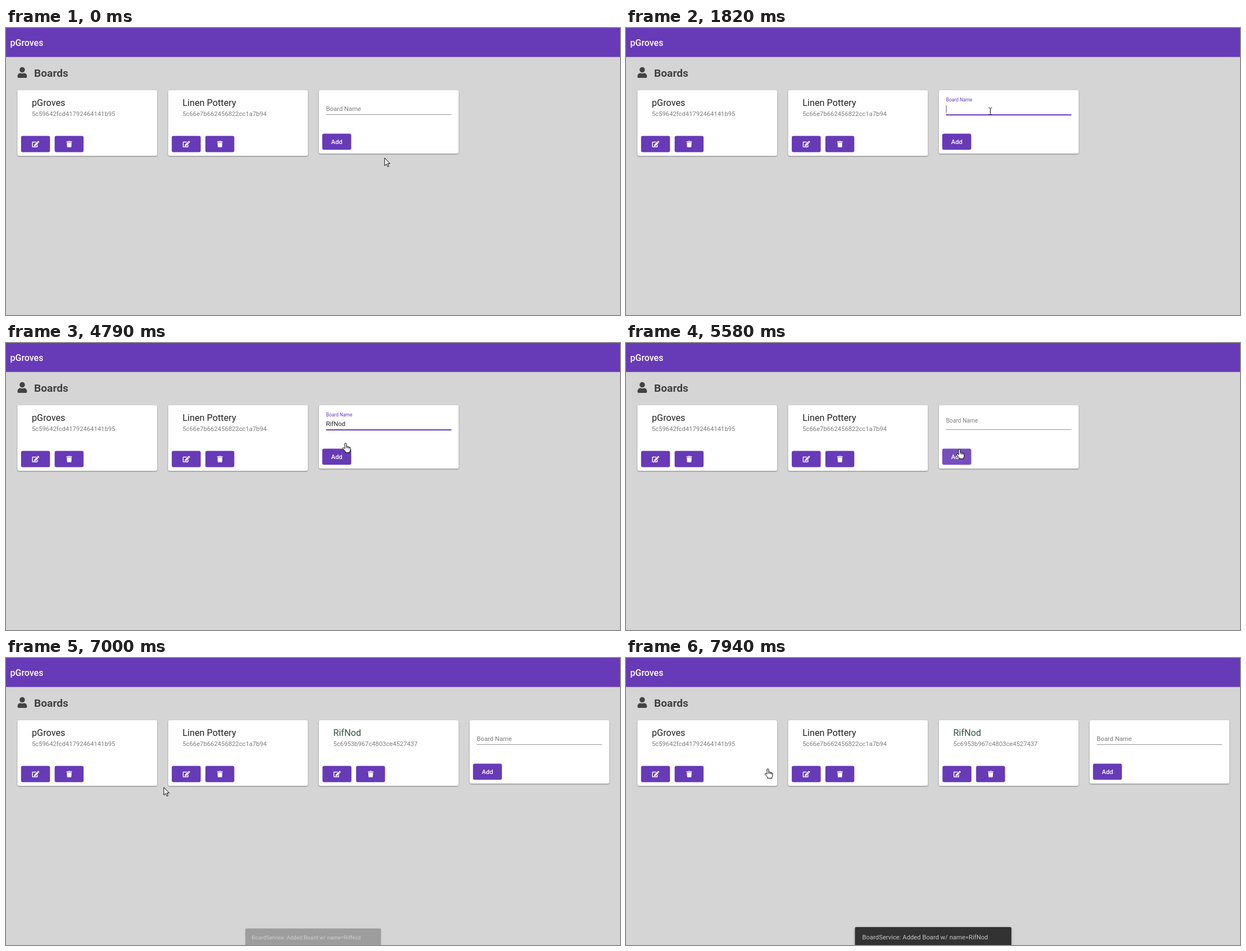
An HTML page that plays this animation: 1093x512 px, repeating every 7.99 s.

```html
<!DOCTYPE html>
<html lang="en">
<head>
<meta charset="utf-8">
<title>Boards</title>
<style>
  html, body { margin: 0; width: 100%; height: 100%; overflow: hidden; background: #d5d5d5; }
  svg { display: block; width: 1093px; height: 512px; font: 11.25px Roboto, sans-serif; }
  .bar, .btn { fill: #673ab7; }
  .card { fill: #fff; filter: drop-shadow(0 1px 1px rgba(0, 0, 0, .4)); }
  .title { font-size: 16.25px; fill: #212121; }
  .muted { fill: #7d7d7d; }
  .medium { font-weight: 500; fill: #fff; }
  .icon { fill: #fff; }
  .snack { fill: #323232; filter: drop-shadow(0 2px 2px rgba(0, 0, 0, .3)); }
  .pointer path { stroke: #000; stroke-linejoin: round; fill: #fff; }
  .pointer #ibeam { fill: none; }
</style>
</head>
<body>
<svg id="stage" viewBox="0 0 1093 512">
  <defs>
    <path id="user" d="M224 256a128 128 0 1 0 0-256 128 128 0 0 0 0 256zM314 288h-17a175 175 0 0 1-146 0h-17A134 134 0 0 0 0 422v42a48 48 0 0 0 48 48h352a48 48 0 0 0 48-48v-42a134 134 0 0 0-134-134z"/>
    <path id="edit" d="M0 112a48 48 0 0 1 48-48h300l-64 64H64v320h320V346l64-64v182a48 48 0 0 1-48 48H48a48 48 0 0 1-48-48zM396 76l104 104-226 226-114 12 12-114zM418 54l43-43a39 39 0 0 1 55 0l49 49a39 39 0 0 1 0 55l-43 43z"/>
    <path id="trash" d="M432 32H312l-9-19a24 24 0 0 0-22-13H167a24 24 0 0 0-21 13l-9 19H16A16 16 0 0 0 0 48v32a16 16 0 0 0 16 16h416a16 16 0 0 0 16-16V48a16 16 0 0 0-16-16zM53 467a48 48 0 0 0 48 45h246a48 48 0 0 0 48-45l21-339H32z"/>
    <clipPath id="addClip"><rect x="563" y="188.5" width="51.5" height="28.8" rx="3"/></clipPath>
  </defs>
  <rect class="bar" width="1093" height="51.7"/>
  <text class="medium" x="7.5" y="32" style="font-size:16px">pGroves</text>
  <use href="#user" fill="#424242" transform="translate(20.5 69.8) scale(.0375)"/>
  <text x="50" y="87" fill="#424242" font-size="19.2" font-weight="700">Boards</text>

  <g id="boards"></g>

  <g id="form">
    <rect class="card" x="557" y="111" width="248.8" height="113" rx="3"/>
    <rect x="569.7" y="154" width="223" height="1" fill="#949494"/>
    <rect id="focusLine" class="bar" x="569.7" y="154" width="223" height="2"/>
    <text id="label">Board Name</text>
    <text id="input" x="569.7" y="148" fill="#212121"></text>
    <rect id="caret" class="bar" y="138" width="1" height="13"/>
    <rect class="btn" x="563" y="188.5" width="51.5" height="28.8" rx="3"/>
    <text class="medium" x="578.7" y="206.5">Add</text>
    <circle id="ripple" cx="593" cy="203" fill="#fff" clip-path="url(#addClip)"/>
  </g>

  <g id="snack">
    <rect class="snack" x="-139.2" y="-19.4" width="278.4" height="38.8" rx="2"/>
    <text x="-126.2" y="3" fill="#c6c6c6">BoardService: Added Board w/ name=RifNod</text>
  </g>

  <g id="pointer" class="pointer">
    <path id="arrow" d="M.5.8V14.6L3.7 11.6 6 16.6 8 15.7 5.8 10.8H10z"/>
    <path id="ibeam" d="M-3-5.5h2l1 1 1-1h2M0-4.5v10M-3 6.5h2l1-1 1 1h2"/>
    <path id="hand" d="M-1.5 10.5V2Q-1.5.5 0 .5T1.5 2V6.3Q3.2 5.6 4.1 7 5.8 6.4 6.5 7.9 8.5 7.4 8.5 9.3V12.5Q8.5 14 7.4 15.4V17.5H-.4V15.6L-4.8 10.6Q-5.4 8.9-4.2 8.6-3.2 8.5-1.5 10.5ZM1.5 6.3V9.5M4.1 7V10M6.5 7.9V10.5"/>
  </g>
</svg>
<script>
const LOOP = 7990, FOCUS = 1520, PRESS = 5200, CLEAR = 5530, ADDED = 7000, BLINK = 530;
const COLUMN = 268.3;
const NAME = "RifNod";
const KEYS = [2560, 2790, 2940, 3690, 3810, 3950];

// time, x, y, shape shown from this time on
const PATH = [
  [0, 673, 231, "arrow"],
  [110, 673, 231, "arrow"],
  [850, 646, 155, "arrow"],
  [950, 648, 152, "ibeam"],
  [1180, 648, 150, "ibeam"],
  [1400, 648, 148, "ibeam"],
  [4660, 648, 148, "ibeam"],
  [4700, 630, 160, "arrow"],
  [4780, 605, 177, "hand"],
  [4800, 603, 178, "hand"],
  [5100, 593, 189, "hand"],
  [5580, 593, 189, "hand"],
  [5780, 556, 195, "arrow"],
  [5830, 532, 200, "hand"],
  [6230, 338, 223, "arrow"],
  [6320, 309, 227, "arrow"],
  [6370, 300, 229, "arrow"],
  [6500, 280, 230, "arrow"],
  [7700, 280, 230, "arrow"],
  [7790, 268, 218, "hand"],
  [7940, 252, 197, "hand"],
  [LOOP, 252, 197, "hand"]
];

const $ = id => document.getElementById(id);
const clamp = v => Math.max(0, Math.min(1, v));
const mix = (a, b, p) => a + (b - a) * p;
const span = (t, start, length) => clamp((t - start) / length);
const easeOut = p => 1 - (1 - p) ** 4;
const show = (node, on) => node.setAttribute("visibility", on ? "visible" : "hidden");

function button(x, icon, width) {
  return `<rect class="btn" x="${x}" y="192.6" width="51.5" height="28.8" rx="3"/>
    <use href="#${icon}" class="icon" transform="translate(${x + 25.9 - width / 2} 201.4) scale(.0222)"/>`;
}

function board([name, id, color], i) {
  return `<g id="board${i}" transform="translate(${i * COLUMN} 0)">
    <rect class="card" x="20.3" y="111" width="248.8" height="117" rx="3"/>
    <text class="title" x="46" y="139" style="fill:${color}">${name}</text>
    <text class="muted" x="46" y="157">${id}</text>
    ${button(26.8, "edit", 12.6)}${button(86.6, "trash", 9.9)}</g>`;
}

$("boards").innerHTML = [
  ["pGroves", "5c59642fcd41792464141b95", "#212121"],
  ["Linen Pottery", "5c66e7b662456822cc1a7b94", "#212121"],
  [NAME, "5c6953b967c4803ce4527437", "#2f5640"]
].map(board).join("");

function drawLabel(t) {
  const up = t < CLEAR ? easeOut(span(t, FOCUS, 400)) : 1 - easeOut(span(t, CLEAR - 40, 400));
  const label = $("label");
  label.setAttribute("transform", `translate(569.7 ${mix(148, 131, up)}) scale(${mix(1, .75, up)})`);
  label.setAttribute("fill", t >= FOCUS && t < PRESS ? "#673ab7" : "#7d7d7d");
}

function drawInput(t) {
  const typed = KEYS.filter(k => k <= t);
  const input = $("input");
  input.textContent = t < CLEAR ? NAME.slice(0, typed.length) : "";
  const lastKey = typed.length ? typed[typed.length - 1] : FOCUS;
  const lit = Math.floor((t - lastKey) / BLINK) % 2 === 0;
  $("caret").setAttribute("x", 569.7 + input.getComputedTextLength());
  show($("caret"), t >= FOCUS && t < PRESS && lit);

  const grow = mix(.5, 1, easeOut(span(t, FOCUS, 220)));
  const line = $("focusLine");
  line.setAttribute("x", 681.2 - 111.5 * grow);
  line.setAttribute("width", 223 * grow);
  line.setAttribute("opacity", span(t, FOCUS, 100) * (1 - span(t, PRESS, 200)));
}

function drawRipple(t) {
  $("ripple").setAttribute("r", 32 * span(t, PRESS, 200));
  $("ripple").setAttribute("opacity", .1 * (1 - span(t, 5650, 350)));
}

function drawSnack(t) {
  const p = mix(.33, 1, span(t, ADDED, 110));
  show($("snack"), t >= ADDED);
  $("snack").setAttribute("transform", `translate(546.8 499.4) scale(${mix(.8, 1, p)})`);
  $("snack").setAttribute("opacity", p);
}

function drawPointer(t) {
  const next = PATH.findIndex(step => step[0] > t);
  const [t0, x0, y0, shape] = PATH[next - 1];
  const [t1, x1, y1] = PATH[next];
  const p = span(t, t0, t1 - t0);
  const x = Math.round(mix(x0, x1, p)) + .5, y = Math.round(mix(y0, y1, p));
  $("pointer").setAttribute("transform", `translate(${x} ${y})`);
  for (const id of ["arrow", "ibeam", "hand"]) show($(id), id === shape);
}

function draw(t) {
  drawLabel(t);
  drawInput(t);
  drawRipple(t);
  drawSnack(t);
  drawPointer(t);
  show($("board2"), t >= ADDED);
  $("form").setAttribute("transform", `translate(${t >= ADDED ? COLUMN : 0} 0)`);
}

const start = performance.now();
function tick() {
  draw((performance.now() - start) % LOOP);
  requestAnimationFrame(tick);
}
tick();
</script>
</body>
</html>
```
